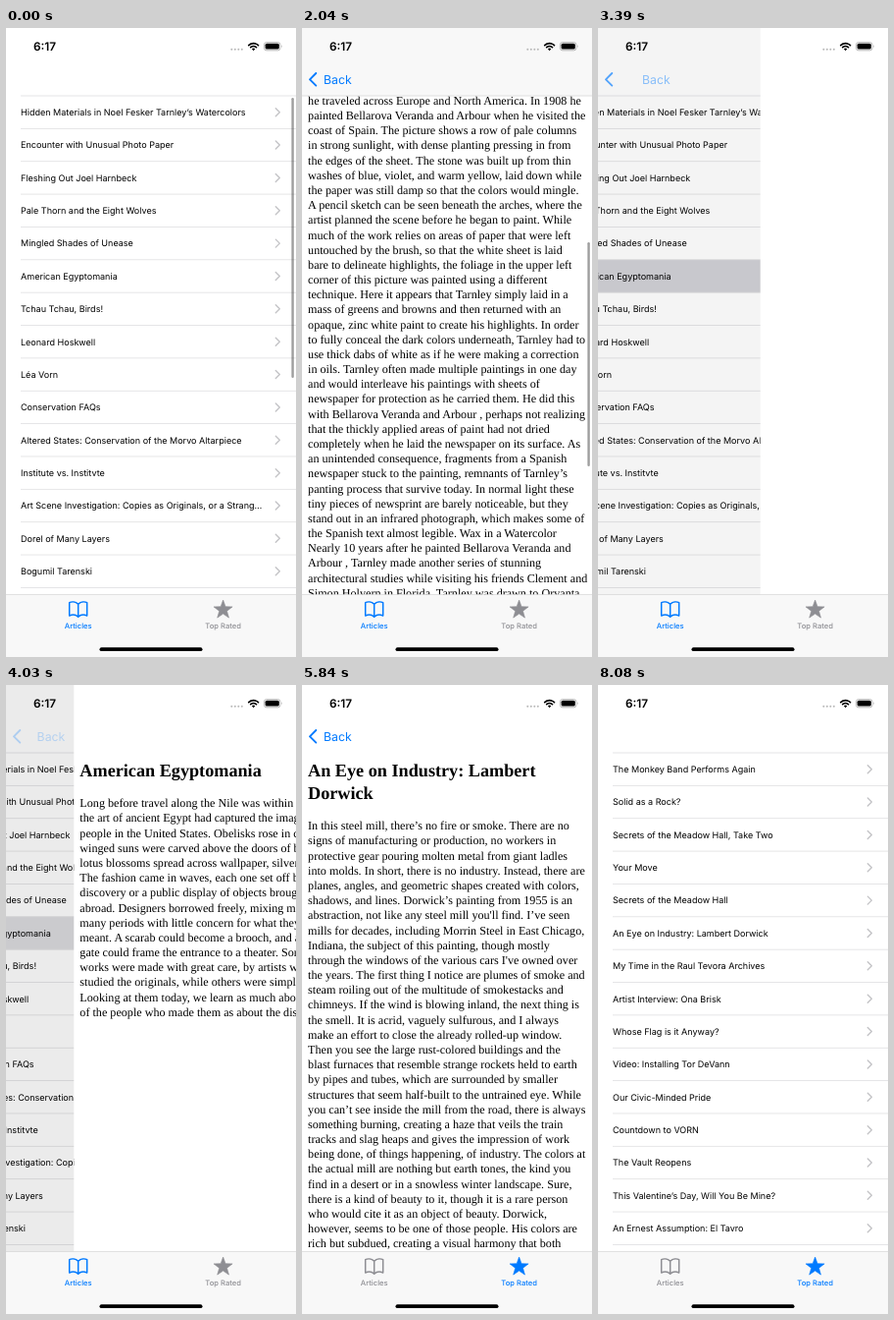
These frames come from a looping animation (296x640 px, 8120 ms). An HTML page:

```html
<!DOCTYPE html>
<html lang="en">
<head>
<meta charset="utf-8">
<title>Article reader</title>
<style>
html, body { margin: 0; width: 100%; height: 100%; overflow: hidden; background: #fff; }
svg { display: block; width: 100%; height: 100%; text-rendering: geometricPrecision; }
text { font-family: Inter, Roboto, sans-serif; white-space: pre; }
.row { font-size: 9.04px; }
.body { font: 12.14px "Liberation Serif", "Times New Roman", serif; }
.title { font: bold 18.2px "Liberation Serif", "Times New Roman", serif; }
.tab { font-size: 7.6px; font-weight: 500; text-anchor: middle; fill: currentColor; }
</style>
</head>
<body>
<svg id="stage" viewBox="0 0 296 640" preserveAspectRatio="none"></svg>
<script>
const W = 296, LOOP = 8120, TOP = 69, ROW = 33.36, LINE = 15.18;
const BLUE = '#007aff', GRAY = '#8e8e93', BAR = '#f8f8f8';

const lists = [`Hidden Materials in Noel Fesker Tarnley’s Watercolors
Encounter with Unusual Photo Paper
Fleshing Out Joel Harnbeck
Pale Thorn and the Eight Wolves
Mingled Shades of Unease
American Egyptomania
Tchau Tchau, Birds!
Leonard Hoskwell
Léa Vorn
Conservation FAQs
Altered States: Conservation of the Morvo Altarpiece
Institute vs. Institvte
Art Scene Investigation: Copies as Originals, or a Strang…
Dorel of Many Layers
Bogumil Tarenski`,
`The Monkey Band Performs Again
Solid as a Rock?
Secrets of the Meadow Hall, Take Two
Your Move
Secrets of the Meadow Hall
An Eye on Industry: Lambert Dorwick
My Time in the Raul Tevora Archives
Artist Interview: Ona Brisk
Whose Flag is it Anyway?
Video: Installing Tor DeVann
Our Civic-Minded Pride
Countdown to VORN
The Vault Reopens
This Valentine’s Day, Will You Be Mine?
An Ernest Assumption: El Tavro`].map(s => s.split('\n'));

// The first two lines of each article form its title.
const articles = [`Hidden Materials in Noel Fesker
Tarnley’s Watercolors
While Noel Fesker Tarnley is most widely known for his
oil portraits of august men and women in fashionable
interiors, he cultivated a love of painting outdoors from
an early age. As a boy he recorded his family’s European
travels in sketchbooks, and as his talent and repertoire
grew, he acquired numerous accoutrements such as
portable easels, sketching umbrellas, rigid pads of paper,
and compact palettes of watercolors that allowed him to
paint multiple pictures during one outing, even in
challenging conditions. In fact, Tarnley was an official
war artist for Britain during World War I and spent four
months on the front painting and sketching. A fellow war
artist, Edgar Pells, painted this watercolor caricature of
Tarnley in 1918, depicting the artist clothed in army
greens and shielded by a sketching umbrella that Tarnley
camouflaged for the purpose. The painting (held in the
collection of the Harbor Hall of Arts in Boston, and not
a part of this exhibition) gives new meaning to
challenging conditions—and shows us a glimpse of
Tarnley’s life apart from glamorous portraits. In
preparation for the current exhibition Noel Fesker Tarnley
and Chicago’s Velvet Era , Quell Academy curators,
conservators, and conservation scientists examined some
of Tarnley’s paintings and investigated his less obvious
materials, finding evidence that provides valuable insight
into the artist’s working process. A Newsworthy Surprise
Tarnley captured hundreds of landscapes in watercolor as
he traveled across Europe and North America. In 1908 he
painted Bellarova Veranda and Arbour when he visited the
coast of Spain. The picture shows a row of pale columns
in strong sunlight, with dense planting pressing in from
the edges of the sheet. The stone was built up from thin
washes of blue, violet, and warm yellow, laid down while
the paper was still damp so that the colors would mingle.
A pencil sketch can be seen beneath the arches, where the
artist planned the scene before he began to paint. While
much of the work relies on areas of paper that were left
untouched by the brush, so that the white sheet is laid
bare to delineate highlights, the foliage in the upper left
corner of this picture was painted using a different
technique. Here it appears that Tarnley simply laid in a
mass of greens and browns and then returned with an
opaque, zinc white paint to create his highlights. In order
to fully conceal the dark colors underneath, Tarnley had to
use thick dabs of white as if he were making a correction
in oils. Tarnley often made multiple paintings in one day
and would interleave his paintings with sheets of
newspaper for protection as he carried them. He did this
with Bellarova Veranda and Arbour , perhaps not realizing
that the thickly applied areas of paint had not dried
completely when he laid the newspaper on its surface. As
an unintended consequence, fragments from a Spanish
newspaper stuck to the painting, remnants of Tarnley’s
panting process that survive today. In normal light these
tiny pieces of newsprint are barely noticeable, but they
stand out in an infrared photograph, which makes some of
the Spanish text almost legible. Wax in a Watercolor
Nearly 10 years after he painted Bellarova Veranda and
Arbour , Tarnley made another series of stunning
architectural studies while visiting his friends Clement and
Simon Holvern in Florida. Tarnley was drawn to Orvanta,
the lavish estate that Simon had recently built, not least of
all because it reminded him of the Italian landscapes and
gardens that he loved to paint. Analytical instruments in
the conservation science lab at the Quell Academy can help
answer a lot of questions about artists’ materials. In the
case of this work, scientists sought more information
about a soft, translucent material found in discrete areas
on its surface. The material was analyzed and determined
to be a wax, which Tarnley used as a “resist”—meaning
that he marked the paper with a transparent material that
would repel the water-based paint and leave highlights in`,
`American Egyptomania

Long before travel along the Nile was within easy reach,
the art of ancient Egypt had captured the imagination of
people in the United States. Obelisks rose in city parks,
winged suns were carved above the doors of banks, and
lotus blossoms spread across wallpaper, silver, and lamps.
The fashion came in waves, each one set off by a new
discovery or a public display of objects brought from
abroad. Designers borrowed freely, mixing motifs from
many periods with little concern for what they had once
meant. A scarab could become a brooch, and a temple
gate could frame the entrance to a theater. Some of these
works were made with great care, by artists who had
studied the originals, while others were simply playful.
Looking at them today, we learn as much about the hopes
of the people who made them as about the distant past.`,
`An Eye on Industry: Lambert
Dorwick
In this steel mill, there’s no fire or smoke. There are no
signs of manufacturing or production, no workers in
protective gear pouring molten metal from giant ladles
into molds. In short, there is no industry. Instead, there are
planes, angles, and geometric shapes created with colors,
shadows, and lines. Dorwick’s painting from 1955 is an
abstraction, not like any steel mill you'll find. I’ve seen
mills for decades, including Morrin Steel in East Chicago,
Indiana, the subject of this painting, though mostly
through the windows of the various cars I've owned over
the years. The first thing I notice are plumes of smoke and
steam roiling out of the multitude of smokestacks and
chimneys. If the wind is blowing inland, the next thing is
the smell. It is acrid, vaguely sulfurous, and I always
make an effort to close the already rolled-up window.
Then you see the large rust-colored buildings and the
blast furnaces that resemble strange rockets held to earth
by pipes and tubes, which are surrounded by smaller
structures that seem half-built to the untrained eye. While
you can’t see inside the mill from the road, there is always
something burning, creating a haze that veils the train
tracks and slag heaps and gives the impression of work
being done, of things happening, of industry. The colors at
the actual mill are nothing but earth tones, the kind you
find in a desert or in a snowless winter landscape. Sure,
there is a kind of beauty to it, though it is a rare person
who would cite it as an object of beauty. Dorwick,
however, seems to be one of those people. His colors are
rich but subdued, creating a visual harmony that both
calms the eye and leads it from one plane to the next. The
walls lean into each other like folded paper, and the sky is
divided by the same clean edges as the roofs below it.
Nothing moves here, and yet the whole scene feels alive
with a quiet order. I think of the people who work inside
and wonder whether they would know the place at all.`
].map(s => s.split('\n'));
articles[2].push(...articles[2].slice(7, 31));

const visits = [
  { tab: 0, row: 0, press: 790, push: 820, pop: 2560, scroll: 1650, reach: 649 },
  { tab: 0, row: 5, press: 3200, push: 3307, pop: 3980, scroll: LOOP, reach: 0 },
  { tab: 1, row: 5, press: 5200, push: 5340, pop: 7500, scroll: 6620, reach: 500 },
];
const TAB_SWITCH = 4550;

const steps = [
  [0, 0, 1], [140, 270, 2], [800, 1250, 5], [1710, 2470, 8], [2590, 3390, 8],
  [3510, 3740, 3], [3920, 4700, 8], [4820, 5630, 8], [5730, 5840, 2],
  [6680, 7440, 8], [7540, 8080, 6],
].flatMap(([a, b, n]) =>
  Array.from({ length: n }, (_, i) => n > 1 ? Math.round(a + (b - a) * i / (n - 1)) : a));

const text = (s, x, y, cls, extra = '') => `<text class="${cls}" x="${x}" y="${y}" ${extra}>${s}</text>`;
const rect = (x, y, w, h, fill, extra = '') =>
  `<rect x="${x}" y="${y}" width="${w}" height="${h}" fill="${fill}" ${extra}/>`;
const stroke = (d, color, width) =>
  `<path d="${d}" fill="none" stroke="${color}" stroke-width="${width}" stroke-linecap="round" stroke-linejoin="round"/>`;

function listMarkup(rows, i) {
  const lines = rows.map((s, r) => {
    const y = TOP + ROW * (r + 1), mid = y - ROW / 2;
    return text(s, 15, mid + 3.3, 'row') +
      stroke(`M275.3 ${mid - 4}l4 4l-4 4`, '#c4c4c7', 1.4) + rect(15, y - .4, W - 15, .8, '#dfdfe1');
  });
  return `<g id="list${i}">${rect(0, 0, W, 640, '#fff')}
    ${rect(0, 0, W, ROW, '#d1d1d6', `id="mark${i}"`)}
    ${rect(15, TOP - .4, W - 15, .8, '#dfdfe1')}${lines.join('')}</g>`;
}

function articleMarkup(lines, i) {
  const shift = lines[1] ? 0 : -23;
  const content = lines.map((s, n) => n < 2
    ? text(s, 6.07, 93 + 23 * n, 'title')
    : text(s, 6.07, 147.3 + shift + LINE * (n - 2), 'body'));
  return `<g id="page${i}">${rect(0, 0, W, 640, '#fff')}
    <g id="text${i}">${content.join('')}</g>
    <g id="bar${i}">${rect(0, 0, W, TOP, BAR)}${rect(0, TOP - .4, W, .8, '#d8d8d8')}</g>
    ${rect(291.4, 71, 2.4, 228, '#000', `id="thumb${i}" rx="1.2"`)}</g>`;
}

const star = Array.from({ length: 10 }, (_, i) => {
  const a = i * Math.PI / 5, r = i % 2 ? 4.1 : 10;
  return `${(221.6 + r * Math.sin(a)).toFixed(2)},${(592 - r * Math.cos(a)).toFixed(2)}`;
}).join(' ');

const book = 'M73.7 586.2C71 583.6 67 583.5 64.7 584.6V598C67.7 596.6 71.4 596.9 73.7 599.2' +
  'C76 596.9 79.7 596.6 82.7 598V584.6C80.4 583.5 76.4 583.6 73.7 586.2V599';

document.getElementById('stage').innerHTML = lists.map(listMarkup).join('') +
  rect(291.4, 71, 2.4, 285, '#000', 'id="listThumb" rx="1.2"') +
  rect(0, 0, W, 640, '#000', 'id="dim"') +
  articles.map(articleMarkup).join('') +
  `<g id="chevron">${stroke('M14.3 46l-6.3 6.3l6.3 6.3', BLUE, 1.9)}</g>` +
  text('Back', 0, 57, '', `id="back" fill="${BLUE}" font-size="12.3"`) +
  rect(0, 577, W, 63, BAR) + rect(0, 576.2, W, .8, '#dadada') +
  `<g id="tab0">${stroke(book, 'currentColor', 1.5)}${text('Articles', 73.7, 611, 'tab')}</g>
   <g id="tab1"><polygon points="${star}" fill="currentColor" stroke="currentColor"
     stroke-width=".6" stroke-linejoin="round"/>${text('Top Rated', 221.6, 611, 'tab')}</g>` +
  rect(95.5, 630.2, 105, 3.9, '#000', 'rx="1.95"') +
  text('6:17', 28, 23, '', 'font-size="11.8" font-weight="600"') +
  [0, 1, 2, 3].map(i => `<circle cx="${230.3 + 3.5 * i}" cy="21.8" r="1" fill="#b8b8b8"/>`).join('') +
  stroke('M247.7 17.6a7 7 0 0 1 9.8 0M249.7 19.7a4.2 4.2 0 0 1 5.8 0', '#000', 1.6) +
  '<path d="M250.9 21.3a2.5 2.5 0 0 1 3.4 0L252.6 23.2Z"/>' +
  rect(263.4, 14.6, 16.6, 8.2, 'none', 'rx="2.5" stroke="#a6a6a6" stroke-width=".8"') +
  rect(264.6, 15.8, 14.2, 5.8, '#000', 'rx="1.5"') +
  '<path d="M281 17.3q1.3 1.4 0 2.8z" fill="#a6a6a6"/>';

const el = Object.fromEntries([...document.querySelectorAll('#stage [id]')].map(e => [e.id, e]));
const show = (e, on) => e.setAttribute('display', on ? 'inline' : 'none');
const fade = (e, v) => e.setAttribute('opacity', v);
const move = (e, x, y = 0) => e.setAttribute('transform', `translate(${x} ${y})`);
const clamp = v => Math.min(1, Math.max(0, v));

// Critically damped spring, from 1 to rest at 0.
function spring(ms) {
  const w = .018 * Math.max(0, ms), v = (1 + w) * Math.exp(-w);
  return v < .0017 ? 0 : v;
}
const cover = (v, t) => t < v.pop ? 1 - spring(t - v.push) : spring(t - v.pop);

function draw(t) {
  const tab = t < TAB_SWITCH ? 0 : 1;
  const current = visits.findLastIndex(v => t >= v.press && v.tab === tab);
  const visit = visits[current];
  const c = visit ? cover(visit, t) : 0;

  lists.forEach((_, i) => {
    show(el['list' + i], i === tab);
    move(el['list' + i], -.3 * W * c);
    el['tab' + i].setAttribute('color', i === tab ? BLUE : GRAY);
    move(el['mark' + i], 0, TOP + ROW * (visit ? visit.row : 0));
    fade(el['mark' + i], visit ? (t < visit.pop ? 1 : c) : 0);
  });
  fade(el.listThumb, .38 * clamp(1 - t / 270));
  fade(el.dim, .1 * c);

  articles.forEach((_, i) => show(el['page' + i], i === current && c > 0));
  if (visit) {
    const u = clamp((t - visit.scroll) / 800);
    const offset = visit.reach * (1 - (1 - u ** 1.4) ** 3);
    move(el['page' + current], W * (1 - c));
    move(el['text' + current], 0, -offset);
    show(el['text' + current], t > visit.push + 120);
    fade(el['bar' + current], clamp(offset / 12));
    move(el['thumb' + current], 0, offset / 900 * 276);
    fade(el['thumb' + current], offset ? .38 : 0);
  }

  const pressed = visit && t > visit.pop - 120 ? .3 : 1;
  fade(el.chevron, pressed * Math.sqrt(c));
  fade(el.back, pressed * c);
  move(el.back, 22 + 41 * (1 - c));
}

const start = performance.now();
function frame() {
  const now = (performance.now() - start) % LOOP;
  draw(steps.findLast(s => s <= now));
  requestAnimationFrame(frame);
}
frame();
</script>
</body>
</html>
```
